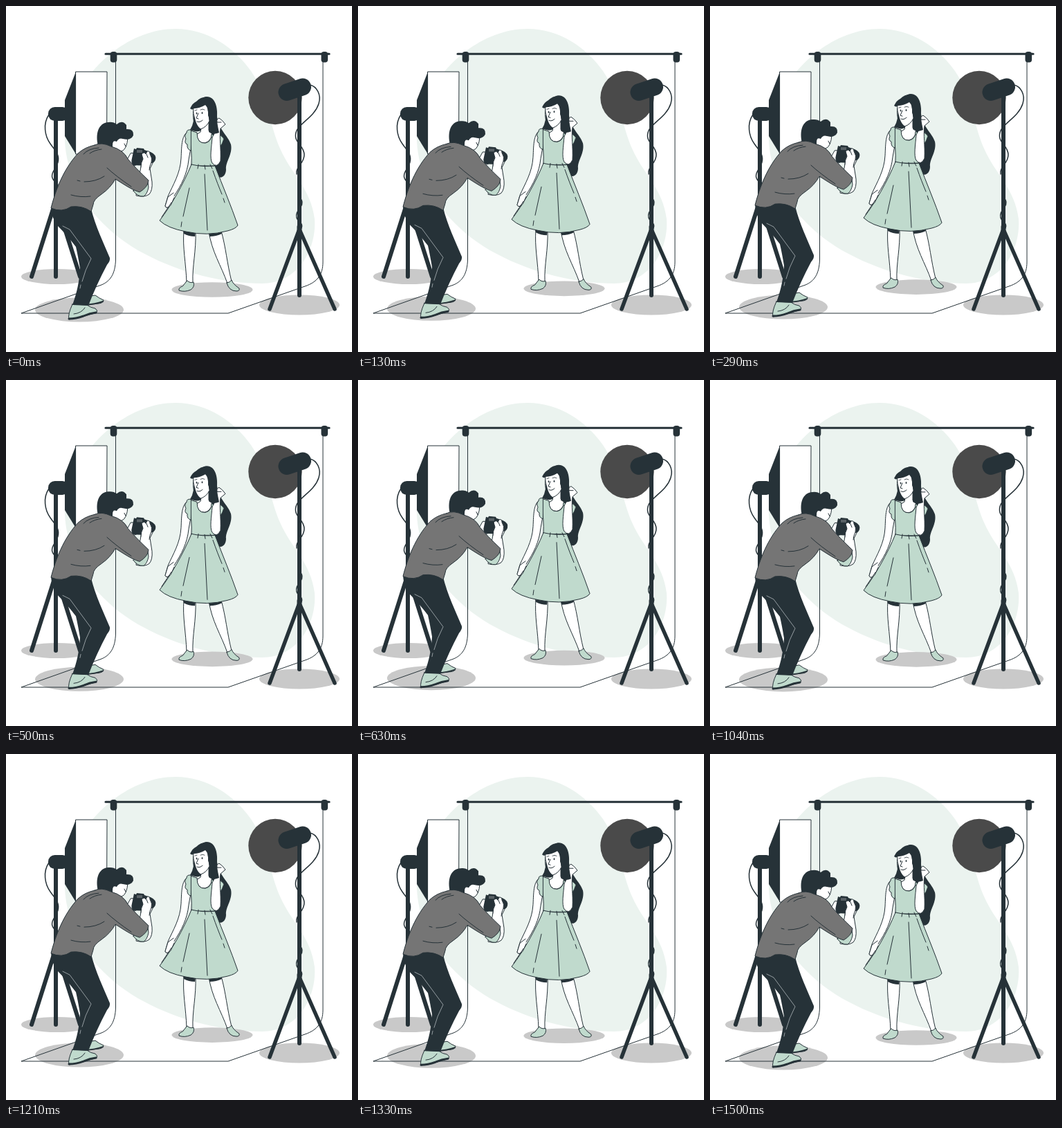
These frames come from a looping animation (500x500 px, 1.54 s). An HTML page:

```html
<!DOCTYPE html>
<html lang="en">
<head>
<meta charset="utf-8">
<title>Photo shoot</title>
<style>
html, body { margin: 0; height: 100%; overflow: hidden; background: #fff; }
svg { display: block; width: 100%; height: 100%; }
.line { fill: none; stroke: #263238; stroke-linecap: round; stroke-linejoin: round; }
.ink { fill: #263238; }
.skin, .mint, .shirt { stroke: #263238; stroke-linejoin: round; stroke-linecap: round; }
.skin { fill: #fff; }
.mint { fill: #c0dacd; }
.shirt { fill: #757575; }
.shade { fill: #c9c9c9; }
</style>
</head>
<body>
<svg viewBox="0 0 500 500">
  <path fill="#ebf3ef" d="M245 33C291 33 330 60 354 94C380 132 380 172 397 208C412 242 441 265 446 308C449 354 420 401 370 401C316 401 252 386 200 358C150 332 109 288 95 244C80 200 82 165 100 135C121 85 180 33 245 33Z"/>

  <g id="shadows">
    <ellipse class="shade" cx="74" cy="391" rx="52" ry="11"/>
    <ellipse class="shade" cx="424" cy="432" rx="58" ry="14.500"/>
    <ellipse class="shade floating" cx="298" cy="410" rx="58.500" ry="10.800"/>
    <ellipse class="shade floating" cx="106" cy="439" rx="64" ry="17.500"/>
  </g>

  <g id="backdrop">
    <path class="line" d="M158.500 78V366C158 388 150 398 138 403L22 444H321L432 405C450 399 458 388 458 370V78"/>
    <path class="line" stroke-width="3" d="M144 69.300H467"/>
    <rect class="ink" x="150.700" y="66" width="9.600" height="15.500" rx="4"/>
    <rect class="ink" x="455.500" y="66" width="9.600" height="15.500" rx="4"/>
  </g>

  <g id="softbox">
    <path class="line" stroke-width="6" d="M72 160V391"/>
    <path class="line" stroke-width="6" d="M71 284L37 391M73 284L107 391"/>
    <path class="line" stroke-width="1.500" d="M62 157C53 170 56 188 64 199C70 208 78 214 75 226C72 236 62 243 69 252L75 258"/>
    <rect class="ink" x="61" y="146" width="30" height="20" rx="9.500"/>
    <path class="skin" d="M101 95H146L145.500 214H101Z"/>
    <path class="ink" d="M101 95L85 136V188L101 214Z"/>
  </g>

  <g id="model" class="floating">
    <path class="ink" d="M290 131C303 131 306 148 305 160C308 180 320 186 325 200C328 214 317 225 318 236C318 247 309 252 302 243L290 185L275 172V145C280 136 284 131 290 131Z"/>
    <path class="skin" d="M257 325C255 350 260 370 261 400H270C269 375 275 355 274 325Z"/>
    <path class="skin" d="M293 325C297 355 311 375 320 401L326 398C319 370 318 350 311 325Z"/>
    <path class="ink" d="M256 325L257 329Q264 333 273 333L274 326ZM293 326L294 333Q304 333 312 329L311 324Z"/>
    <path class="mint" d="M262 397Q266 401 271 399Q273 406 267 410Q258 414 250 411Q249 407 255 405Z"/>
    <path class="mint" d="M319 400Q323 400 326 396Q328 402 337 408Q338 412 333 412Q322 412 319 400Z"/>
    <path class="mint" d="M303 186Q312 186 315 192Q313 199 309 204L301 207Z"/>
    <path class="skin" d="M266 180C253 184 254 202 253 220C252 242 241 259 234 275L230 289Q232 294 238 288L242 276C254 258 262 242 264 222L267 205Z"/>
    <path class="skin" d="M283 172L281 182L275 186Q277 198 287 198Q296 196 298 185L293 180V160Z"/>
    <path class="mint" d="M267 180L276 183Q276 199 288 198Q297 196 297 185L302 188L301 231H268Q269 207 265 194Z"/>
    <path class="mint" d="M267 179Q261 178 261 183Q257 187 260 192Q257 198 262 200Q261 207 267 209Z"/>
    <path class="mint" d="M268 229Q285 233 302 231C313 260 325 288 335 317Q332 322 320 325Q291 333 260 326Q233 321 222 310C239 288 256 258 268 229Z"/>
    <path class="skin" d="M242 270L234 276L230 289Q232 294 238 288L243 277"/>
    <path class="line" d="M278 229L277 235M287 230L288 236M295 229L298 235M265 263L256 304M254 312L253 319M287 243L291 324M299 238Q306 258 312 272M314 278L316 284M239 284L225 305"/>
    <path class="skin" d="M298 190C297 204 294 220 298 227Q305 235 310 224C311 205 308 190 310 177L317 171Q313 165 308 162Q304 163 305 168L299 171Q300 176 302 178Q302 185 298 190Z"/>
    <path class="line" d="M305 168L311 168"/>
    <path class="skin" d="M271 148C269 162 272 176 281 178Q290 175 294 166L291 141Z"/>
    <path class="ink" d="M266 148Q270 140 275 138Q283 130 293 132Q303 135 304 151Q304 166 308 183Q299 187 293 182Q297 167 292 158Q293 148 288 143Q280 148 271 148Q270 151 266 148ZM271 149C273 167 276 174 282 178Q281 184 266 179Q273 169 271 149Z"/>
    <path class="line" d="M278 155L275 162L278 163M276 167Q280 169 284 165"/>
    <path class="line" stroke-width=".8" d="M273 151L276 150M281 150Q284 148 287 150"/>
    <ellipse class="ink" cx="275.500" cy="155" rx=".9" ry="1.500"/>
    <ellipse class="ink" cx="283.500" cy="154.500" rx=".9" ry="1.500"/>
  </g>

  <g id="spotlight">
    <circle cx="389" cy="132.500" r="38.700" fill="#4a4a4a"/>
    <path class="line" stroke-width="6" d="M424 125V418"/>
    <path class="line" stroke-width="5.500" d="M423 325L381 438M425 325L475 438"/>
    <path class="line" stroke-width="7" d="M424 319V328"/>
    <path class="line" stroke-width="1.500" d="M439 114C449 116 456 128 452 141C446 160 426 168 420 180C413 197 431 200 431 215C431 228 418 232 420 243M427 280C432 290 417 295 420 306C422 313 430 313 427 321"/>
    <path class="line" stroke-width="25" d="M406 124.500L428.500 117"/>
  </g>

  <g id="photographer" class="floating">
    <path class="mint" d="M117 420L129 418Q134 422 141 425Q141 429 134 430L113 432Z"/>
    <path class="line" stroke-width="2" d="M140 427Q129 431 114 432"/>
    <path class="mint" d="M96 431L117 432Q122 436 129 437Q133 440 131 443L110 449L91 453Q89 446 96 431Z"/>
    <path class="line" d="M98 445Q109 444 114 436"/>
    <path class="line" stroke-width="3" d="M130 443Q121 444 112 448Q101 452 91 452"/>
    <path class="ink" d="M65 291Q94 283 123 293C129 318 141 342 150 364Q151 368 146 374Q131 402 119 433L96 432C103 413 106 397 107 379Q104 361 101 348Q88 331 75 318Q66 307 65 291Z"/>
    <path class="line" style="stroke:#b0b8bb" stroke-width=".8" d="M82 318L92 323L123 365Q114 382 110 398M108 403L107 408"/>
    <path class="skin" d="M180 213L175 222L182 232L190 229L188 213Z"/>
    <path class="skin" d="M152 190L153 205Q158 213 167 210Q175 207 176 190Z"/>
    <path class="ink" d="M133 202C129 185 133 169 148 168Q155 167 160 171Q168 164 174 172Q174 177 174 178Q185 177 184 187Q180 195 169 192Q163 190 160 196Q154 193 154 201L154 207Z"/>
    <path class="line" d="M171 199L173 203"/>
    <path class="skin" d="M196 226L194 238L190 256L188 274Q200 277 207 272Q212 266 211 254L208 235L213 225Z"/>
    <path class="mint" d="M184 267L202 249Q206 254 206 262Q204 272 199 275Q190 276 184 267Z"/>
    <path class="shirt" d="M128 201Q138 196 152 203Q170 208 176 221Q186 233 206 252Q205 262 193 269Q183 266 169 257L158 250Q151 263 138 272Q126 280 126 287L123 297Q110 288 94 290Q81 299 65 292C72 265 83 236 104 213Q114 204 128 201Z"/>
    <path class="line" d="M146 234Q159 246 181 261M103 252L107 253M113 254Q130 254 142 246M94 273Q108 277 122 275M112 214Q119 206 134 205M121 213Q128 208 138 207"/>
    <path class="ink" d="M185 206L188 207L189 205L199 206L200 208L209 211Q218 215 216 222Q214 228 208 227L206 231L184 230Q180 227 182 220Z"/>
    <path fill="#596166" d="M189 208L197 208L197 212L189 212Z"/>
    <path class="skin" d="M195 233Q195 226 198 221L196 214Q200 210 202 214L204 210Q208 209 208 214Q212 220 210 226Q207 232 207 237"/>
    <path class="line" d="M203 214L205 219"/>
  </g>
</svg>
<script>
const LOOP = 1540, STEP = 1500 / 36, RISE = 10;
const floating = document.querySelectorAll('.floating');

// Linear rise and fall, stepped at 24 poses per second.
function draw() {
  const time = performance.now() % LOOP;
  const pose = Math.min(36, Math.floor((time + 2) / STEP));
  const y = -RISE * (1 - Math.abs(1 - pose / 18));
  for (const part of floating) part.setAttribute('transform', `translate(0 ${y})`);
  requestAnimationFrame(draw);
}
draw();
</script>
</body>
</html>
```
